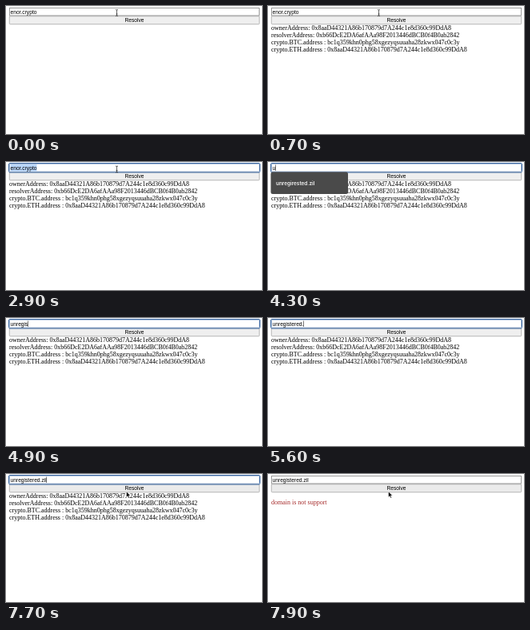
These frames come from a looping animation (320x160 px, 8 s). An HTML page:

```html
<!DOCTYPE html>
<html lang="en">
<head>
<meta charset="utf-8">
<title>Resolve a domain</title>
<style>
  html, body { margin: 0; width: 100%; height: 100%; overflow: hidden; background: #fff; }
  /* laid out at double size, shown at half */
  #page { position: absolute; left: 0; top: 0; width: 640px; height: 320px; transform: scale(.5); transform-origin: 0 0;
    font: 16px/18px "Liberation Serif", serif; color: #000; white-space: pre; overflow: hidden; }
  #page > * { position: absolute; box-sizing: border-box; }
  #field, #button { left: 8px; width: 626px; height: 21px; font: 13.333px/17px "Liberation Sans", sans-serif; }
  #field { top: 4px; padding-left: 1px; border: 2px solid #999; background: #fff; }
  #field.focus { border-color: #a9bdd8; border-radius: 2px; outline: 2px solid #3a669f; z-index: 1; }
  #field.selected #value { background: #bad7fb; }
  #value { display: inline-block; height: 17px; }
  #caret { display: inline-block; width: 1px; height: 15px; margin-top: 1px; background: #000; vertical-align: top; }
  #button { top: 25px; border: 1px solid #767676; border-radius: 3px; background: #efefef; text-align: center; line-height: 19px; }
  #button.hover { background: #ebebeb; }
  #records { left: 8px; top: 46px; }
  #error { left: 8px; top: 62px; color: #a52a2a; }
  #hint { left: 7px; top: 25px; width: 193px; height: 55px; padding-left: 13px; border-radius: 5px; background: #4a4a4a;
    color: #f4f4f4; font: 600 12.8px/55px Inter, sans-serif; z-index: 2; }
  #pointer { left: 0; top: 0; width: 24px; height: 24px; overflow: visible; z-index: 3; }
</style>
</head>
<body>
<div id="page">
  <div id="field"><span id="value"></span><span id="caret"></span></div>
  <div id="button">Resolve</div>
  <div id="records">ownerAddress: 0x8aaD44321A86b170879d7A244c1e8d360c99DdA8
resolverAddress: 0xb66DcE2DA6afAAa98F2013446dBCB0f4B0ab2842
crypto.BTC.address : bc1q359khn0phg58xgezyqsuuaha28zkwx047c0c3y
crypto.ETH.address : 0x8aaD44321A86b170879d7A244c1e8d360c99DdA8</div>
  <div id="error">domain is not support</div>
  <div id="hint">unregirested.zil</div>
  <svg id="pointer">
    <path id="beam" d="M-3-8Q0-8 0-6Q0-8 3-8M0-6V6M-3 8Q0 8 0 6Q0 8 3 8M-2 3H2" fill="none" stroke="#222" stroke-width="1.4"/>
    <path id="arrow" d="M0 0V14L3.3 11L5.6 16L8 15L5.8 10H10Z" fill="#000" stroke="#fff" stroke-width="1"/>
  </svg>
</div>
<script>
const LOOP = 8000, STEP = 100;
const FIRST = "enor.crypto", SECOND = "unregistered.zil";
const FOCUS = 1800, SELECT = 2900, TYPE = 4300, MOVE = 7100, ARRIVE = 7700, PRESS = 7800, FAIL = 7900;

// moment at which each letter of the second domain is typed
const keys = [...SECOND].map((c, i) => i < 12 ? TYPE + i * 100 : [5600, 6300, 6400, 6600][i - 12]);

const el = id => document.getElementById(id);
const show = (id, on) => el(id).style.display = on ? "" : "none";

function draw(t) {
  const typed = keys.filter(k => k <= t);
  const focused = t >= FOCUS && t < PRESS;
  const selected = t >= SELECT && t < TYPE;
  const lastInput = typed.length ? typed[typed.length - 1] : FOCUS;

  el("value").textContent = typed.length ? SECOND.slice(0, typed.length) : FIRST;
  el("field").className = (focused ? "focus " : "") + (selected ? "selected" : "");
  show("caret", focused && !selected && (t - lastInput) % 1000 < 500);
  show("hint", typed.length > 0 && typed.length < 7);
  show("records", t >= 700 && t < FAIL);
  show("error", t >= FAIL);

  // the pointer hides while typing and returns when moved
  const p = Math.min(1, Math.max(0, (t - MOVE) / (ARRIVE - MOVE)));
  const ease = 1 - (1 - p) ** 2;
  const x = 277 + 24 * ease, y = (t < 1600 ? 17 : 18) + 26 * ease;
  const overButton = y > 25;
  show("pointer", t < TYPE || t >= MOVE);
  show("beam", !overButton);
  show("arrow", overButton);
  el("pointer").style.transform = `translate(${x}px, ${y}px)`;
  el("button").className = overButton ? "hover" : "";
}

function tick() {
  const t = performance.now() % LOOP;
  draw(Math.floor(t / STEP) * STEP);
  requestAnimationFrame(tick);
}
tick();
</script>
</body>
</html>
```
